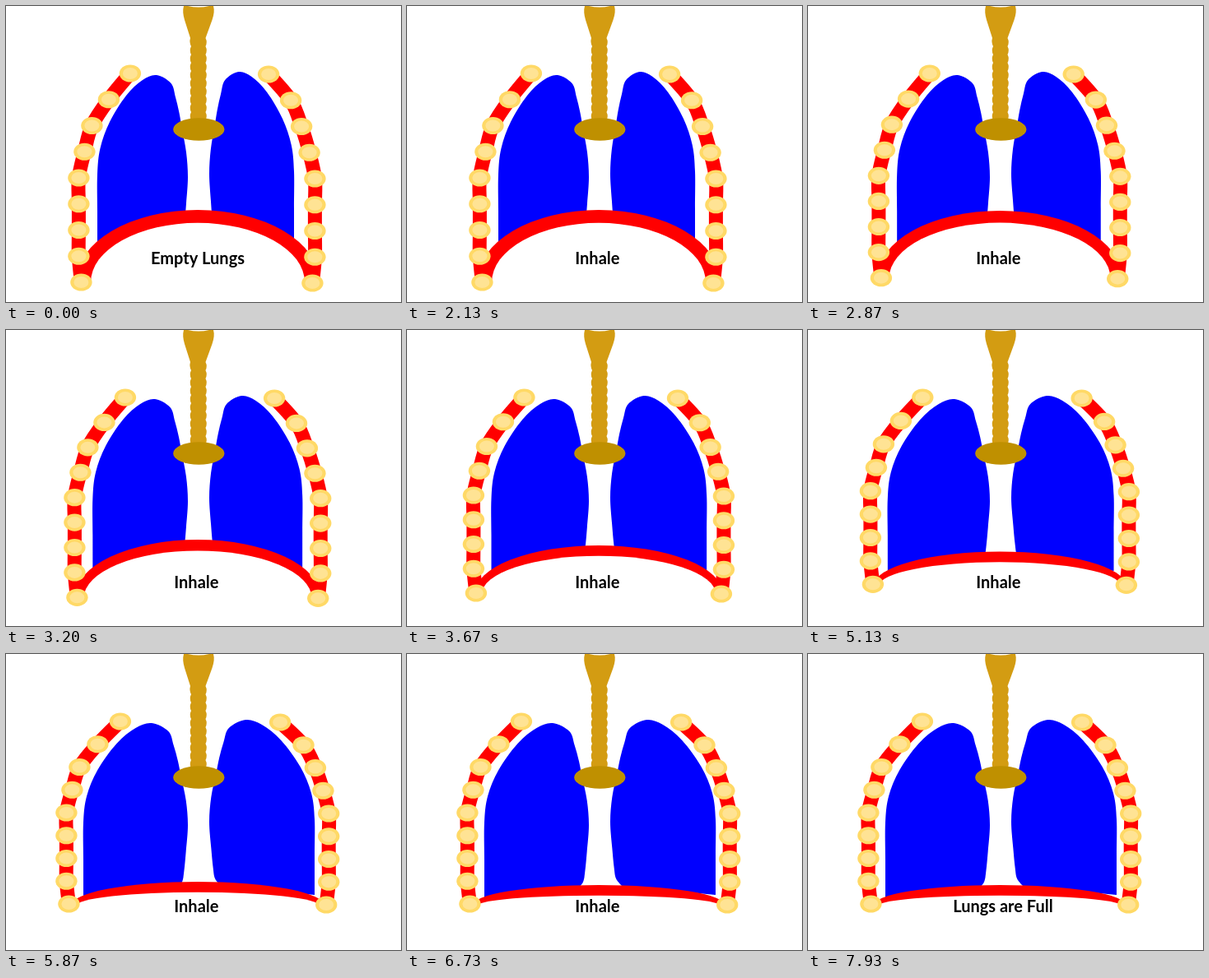
An HTML page with a canvas for the animation above (8 s loop, 480 by 360 pixels).

```html
<!DOCTYPE html>
<html lang="en">
<head>
<meta charset="utf-8">
<title>Breathing in</title>
<style>
  html, body { margin: 0; width: 100%; height: 100%; overflow: hidden; background: #fff; }
  canvas { display: block; width: 480px; height: 360px; }
</style>
</head>
<body>
<canvas id="stage" width="480" height="360"></canvas>
<script>
const ctx = document.getElementById('stage').getContext('2d');
const LOOP = 8000, START = 1461.5, STEP = 733.4;
const POSES = 6, BEADS = 9;

// Height of the diaphragm's crown at each step of the breath
const CROWN = [248, 249, 255, 262, 266, 269.5, 277, 281];

// One lung, as distance from its inner edge and height
const LUNG = [
  [12, 286], [6, 277], [4, 264], [2, 240], [0, 208], [2, 178], [7, 150],
  [10.5, 130], [15, 111], [20.5, 94], [38, 84], [55, 90], [75, 109], [95, 141],
  [106.5, 173], [110, 205], [110, 250], [110, 297]
];

// dir points outwards; rate shapes how the side widens; bow bends the upper ribs inwards
const SIDES = [
  { dir: -1, rate: 1, hilum: 221, lungTop: 0, lung: 110, lungGrow: 17,
    rib: 88.4, ribTop: 82, bow: [62.5, 36.5, 16, 7], topMove: 12, sideMove: 15 },
  { dir: 1, rate: 0.82, hilum: 247, lungTop: -4, lung: 103, lungGrow: 25,
    rib: 375.4, ribTop: 83, bow: [56.3, 29.3, 16.3, 6.8], topMove: 14, sideMove: 16.8 }
];

function ellipse(x, y, rx, ry, color, from = 0) {
  ctx.beginPath();
  ctx.ellipse(x, y, rx, ry, 0, from, 2 * Math.PI);
  ctx.fillStyle = color;
  ctx.fill();
}

// Curve passing through every point
function smooth(pts) {
  ctx.beginPath();
  ctx.moveTo(...pts[0]);
  for (let i = 0; i < pts.length - 1; i++) {
    const p = pts[i], q = pts[i + 1], a = pts[i - 1] || p, b = pts[i + 2] || q;
    ctx.bezierCurveTo(
      p[0] + (q[0] - a[0]) / 6, p[1] + (q[1] - a[1]) / 6,
      q[0] - (b[0] - p[0]) / 6, q[1] - (b[1] - p[1]) / 6, q[0], q[1]);
  }
}

function lung(side, u) {
  const scale = side.dir * (side.lung + side.lungGrow * u ** side.rate) / 110;
  smooth(LUNG.map(([x, y]) => [side.hilum + x * scale, y + side.lungTop]));
  ctx.closePath();
  ctx.fillStyle = '#0000ff';
  ctx.fill();
}

function diaphragm(stage, u) {
  const base = 336 - 30 * u, top = CROWN[stage];
  const thick = Math.max(12.7, 15.8 - 1.2 * stage);
  ellipse(233, base, 148 + 6 * u, base - top, '#ff0000', Math.PI);
  ellipse(233, base, 130 + 17 * Math.sin(u * Math.PI / 2), base - top - thick, '#fff', Math.PI);
}

function ribs(side, u) {
  const gap = (254 - 32 * u) / (BEADS - 1);
  const topMove = side.topMove * Math.sin(u * Math.PI / 2);
  const sideMove = side.sideMove * u ** side.rate;
  const beads = Array.from({ length: BEADS }, (_, i) => {
    const move = topMove + (sideMove - topMove) * Math.min(1, i / 2);
    const bow = i === BEADS - 1 ? 3 : side.bow[i] || 0;
    return [side.rib + side.dir * (move - bow), side.ribTop + i * gap];
  });
  smooth(beads);
  ctx.lineWidth = 17;
  ctx.strokeStyle = '#ff0000';
  ctx.stroke();
  for (const [x, y] of beads) {
    ellipse(x, y, 13.2, 10.6, '#ffd966');
    ellipse(x, y, 9, 7, '#ffe394');
  }
}

function windpipe() {
  const left = 225, right = 242.5, neck = 39, end = 139, ring = 10;
  ctx.beginPath();
  ctx.moveTo(216, 0);
  ctx.quadraticCurveTo(214, 7, 217, 17);
  ctx.lineTo(left - 1, neck);
  for (let y = neck; y < end; y += ring) ctx.quadraticCurveTo(left - 2.5, y + ring / 2, left, y + ring);
  ctx.lineTo(right, end);
  for (let y = end; y > neck; y -= ring) ctx.quadraticCurveTo(right + 2.5, y - ring / 2, right, y - ring);
  ctx.lineTo(250.5, 17);
  ctx.quadraticCurveTo(254, 7, 252, 0);
  ctx.lineTo(247, 0);
  ctx.quadraticCurveTo(234, 3, 221, 0);
  ctx.closePath();
  ctx.fillStyle = '#d39c12';
  ctx.fill();
  ellipse(234.3, 150, 31.2, 13.8, '#bf9000');
}

function label(step) {
  const [text, x] = step < 0 ? ['Empty Lungs', 176]
    : step < 8 ? ['Inhale', 204.3] : ['Lungs are Full', 176.2];
  ctx.font = '700 20px Lato, Carlito, sans-serif';
  ctx.fillStyle = '#000';
  ctx.fillText(text, x, 314);
}

function draw(t) {
  const step = Math.floor((t - START) / STEP);
  const stage = Math.max(0, Math.min(CROWN.length - 1, step));
  const u = Math.min(1, stage / POSES);

  ctx.fillStyle = '#fff';
  ctx.fillRect(0, 0, 480, 360);
  SIDES.forEach(side => lung(side, u));
  diaphragm(stage, u);
  SIDES.forEach(side => ribs(side, u));
  windpipe();
  label(step);
}

const origin = performance.now();
function tick() {
  draw((performance.now() - origin) % LOOP);
  requestAnimationFrame(tick);
}
tick();
</script>
</body>
</html>
```
